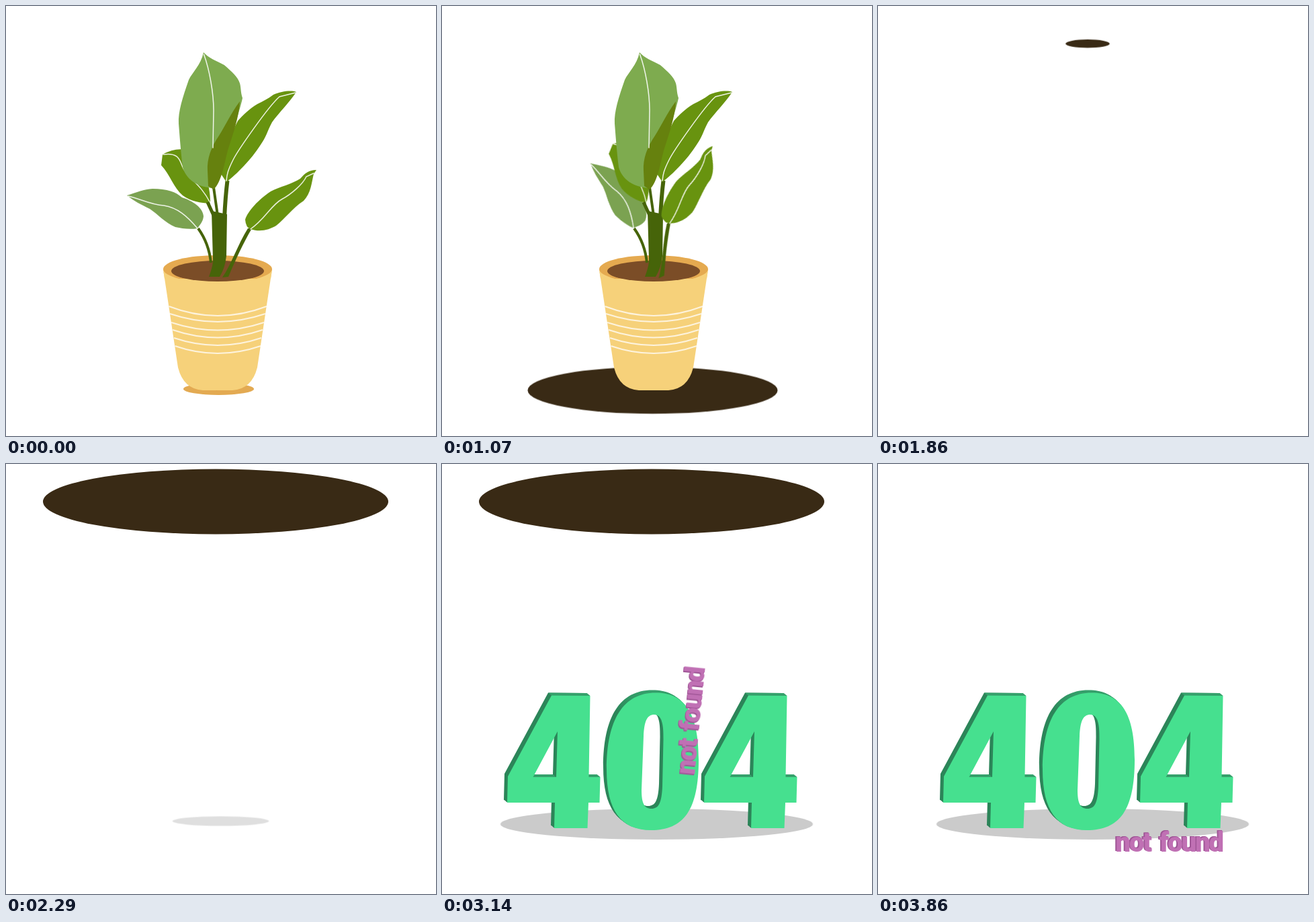
An HTML page for the animation above (5 s loop, 640 by 640 pixels).

```html
<!DOCTYPE html>
<html lang="en">
<head>
<meta charset="utf-8">
<title>404 not found</title>
<style>
  html, body { margin: 0; width: 100%; height: 100%; overflow: hidden; background: #fff; }
  svg { display: block; width: 100vw; height: 100vh; }

  .anim { animation: 5s linear infinite; }
  .vein { fill: none; stroke: #fff; stroke-opacity: .88; stroke-width: 1.5; stroke-linecap: round; }
  .stripe { fill: none; stroke: #fff; stroke-opacity: .75; stroke-width: 1.9; }
  .stalk { fill: none; stroke: #466409; }
  .light { fill: #7eab4f; }
  .green { fill: #68930f; }
  .fold { fill: #66810e; }
  .stem { fill: #466409; }
  .hole { fill: #392a15; }
  .wall { fill: #2c8559; }
  .ledge { fill: #35a06b; }
  .face { fill: #46e08f; }
  .label {
    font: 900 40px Roboto, "Liberation Sans", sans-serif;
    letter-spacing: -2.1px;
    word-spacing: 5px;
  }

  /* leaves lift while the floor opens, then everything drops */
  .low-right { transform-origin: 326px 403px; animation-name: low-right; }
  .low-left { transform-origin: 286px 331px; animation-name: low-left; }
  .back-left { transform-origin: 304px 294px; animation-name: back-left; }
  @keyframes low-right { 0% { transform: rotate(0deg); } 23%, 100% { transform: rotate(-20.4deg); } }
  @keyframes low-left { 0% { transform: rotate(0deg); } 23%, 100% { transform: rotate(33.6deg); } }
  @keyframes back-left { 0% { transform: rotate(0deg); } 23%, 100% { transform: rotate(16.1deg); } }

  .plant { animation-name: plant; }
  @keyframes plant {
    0%, 23% { transform: translateY(0); animation-timing-function: cubic-bezier(.333, 0, .667, .333); }
    28.8%, 100% { transform: translateY(545px); }
  }

  .saucer { animation-name: saucer; }
  @keyframes saucer {
    0%, 10% { visibility: visible; }
    10.01%, 100% { visibility: hidden; }
  }

  .floor { animation-name: floor; }
  @keyframes floor {
    0% { transform: scale(0); }
    10% { transform: scale(.898); }
    30% { transform: scale(1); }
    34%, 100% { transform: scale(0); }
  }

  .ceiling { animation-name: ceiling; }
  @keyframes ceiling {
    0%, 36.3% { transform: scale(0); }
    43.5%, 63% { transform: scale(1); }
    69.8%, 100% { transform: scale(0); }
  }

  .shadow { animation-name: shadow; }
  @keyframes shadow {
    0%, 39.3% { transform: translateY(-6.5px) scale(0); opacity: .09; }
    60.4%, 100% { transform: translateY(0) scale(1); opacity: .207; }
  }

  .digits { animation-name: digits; }
  @keyframes digits {
    0%, 48.6% { transform: translate(6.9px, -502px); animation-timing-function: cubic-bezier(.333, 0, .667, 0); }
    59.72%, 100% { transform: translate(0, 0); }
  }

  .label { animation-name: label; }
  @keyframes label {
    0%, 56.99% {
      visibility: hidden;
      transform: translate(376px, 43px) rotate(-84.4deg);
    }
    57% {
      visibility: visible;
      transform: translate(376px, 43px) rotate(-84.4deg);
      animation-timing-function: cubic-bezier(.333, 0, .667, .333);
    }
    63.56%, 70.3% {
      visibility: visible;
      transform: translate(376px, 577px) rotate(-84.4deg);
      animation-timing-function: cubic-bezier(.333, 0, .667, .333);
    }
    77.2%, 100% {
      visibility: visible;
      transform: translate(353.5px, 577px) rotate(0deg);
    }
  }
</style>
</head>
<body>
<svg viewBox="0 0 640 640">
  <defs>
    <clipPath id="above-floor">
      <path d="M0 0H640V572H508A194.5 36.5 0 0 1 119 572H0Z"/>
    </clipPath>
    <clipPath id="below-ceiling"><rect y="43" width="640" height="597"/></clipPath>
    <linearGradient id="curve" x1="0" y1="0" x2="0" y2="1">
      <stop offset="0" stop-color="#35a06b"/>
      <stop offset=".15" stop-color="#2c8559"/>
    </linearGradient>
    <path id="four" fill-rule="evenodd" d="M163 344.5L220.5 345L218.5 466H235.5L234.5 504H218L216.5 542H167L168 504H97L98 465Z
      M172 398L170 466H135.5Z"/>
    <path id="zero" fill-rule="evenodd" d="M318 340.5C362 340.5 382 372 382 440C382 515 360 545 311 545C266 545 245 515 245 455C245 380 270 340.5 318 340.5Z
      M316 373C327 373 330 387 329.5 410L328 480C327 505 322 513 312 513C300 513 297 503 297 485L300 405C301 383 305 373 316 373Z"/>
    <g id="four-solid">
      <g class="wall">
        <use href="#four" x="-5" y="-4"/><use href="#four" x="-4" y="-3.2"/>
        <use href="#four" x="-3" y="-2.4"/><use href="#four" x="-2" y="-1.6"/>
        <use href="#four" x="-1" y="-.8"/>
      </g>
      <path class="ledge" d="M158 340.5L215.5 341L220.5 345L163 344.5ZM214 462H230.5L235.5 466H218ZM137 462H165L170 466H135Z"/>
      <use class="face" href="#four"/>
    </g>
  </defs>

  <ellipse class="anim saucer" cx="316.5" cy="570" rx="52.5" ry="9" fill="#e3aa52"/>
  <g transform="translate(313.5 572)">
    <ellipse class="anim floor hole" rx="194.5" ry="36.5"/>
  </g>

  <g clip-path="url(#above-floor)">
    <g class="anim plant">
      <path fill="#f6d17a" d="M234 392L256 538Q264 570 293 572H337Q366 570 374 538L396 392Z"/>
      <ellipse cx="315" cy="391.5" rx="81" ry="20.5" fill="#e5aa50"/>
      <path fill="#f6d17a" d="M234 393A81 20 0 0 0 396 393L394 406H236Z"/>
      <ellipse cx="315" cy="394.5" rx="69" ry="15.5" fill="#7b4d27"/>
      <path class="stripe" d="M242.5 447Q315 475 388 447M244 458Q315 482 386 458M246 471Q315 494 384 471
        M248 482Q315 505 382 482M250 494Q315 516 380 494M251.5 506Q315 528 379 506"/>

      <g class="anim low-left">
        <path fill="#7ba251" d="M180 282C195 277 205 273 218 272C240 272 253 277 262 285C278 290 293 300 294 313C293 322 288 326 285 331C272 333 262 331 252 329C236 322 226 310 214 302C200 295 190 290 180 282Z"/>
        <path class="vein" d="M182 283C200 287 215 296 235 297C255 300 270 313 285 331"/>
      </g>
      <g class="anim back-left">
        <path class="green" d="M233 221C245 214 260 211 270 215C295 235 305 270 304 294C290 293 275 291 263 282C249 270 245 252 231 237Z"/>
        <path class="vein" d="M234 221C262 217 258 235 266 245C276 260 290 266 304 293"/>
      </g>

      <path class="stem" d="M302 403C306 392 308 385 308 378L306 305L329 310L328 372Q326 390 318 403Z"/>
      <path class="stalk" stroke-width="4" d="M286 331C296 345 303 362 305 382M309 270L315 312"/>
      <path class="stalk" stroke-width="5" d="M300 292L311 316"/>
      <path class="stalk" stroke-width="6" d="M329.5 260C327 280 326 295 325 316"/>

      <path class="green" d="M432 128C425 125 409 127 398 132C390 138 382 142 374 146C362 153 352 163 345 171C335 190 325 220 320 250L328 262C343 251 366 227 378 208C388 194 388 188 396 173C406 159 424 141 432 128Z"/>
      <path class="vein" d="M431 129L407 135C390 150 345 215 338 229C330 245 329 250 328 260"/>

      <path class="light" d="M294 69C302 78 312 81 325 88C336 98 345 105 348 115C350 122 349 128 352 137C347 160 330 210 309 271C285 270 268 258 263 240C260 215 259 200 257 175C256 157 263 136 272 110C277 99 290 88 294 69Z"/>
      <path class="fold" d="M348 142C335 159 326 179 317 193C305 210 299 228 300 245L301 268L309 273C321 262 325 234 330 215C338 190 347 165 348 142Z"/>
      <path class="vein" d="M294.5 72C303 95 309 130 309 155L308 211"/>

      <g class="anim low-right">
        <path class="stem" d="M366 331C352 355 343 375 331 403L322 404C335 385 345 355 360 331Z"/>
        <path class="green" d="M462 244C451 244 445 249 438 257C426 265 407 269 394 276C376 288 360 305 356 318Q357 330 364 332C378 337 392 333 402 327C415 317 426 301 443 290C454 279 455 262 458 250Z"/>
        <path class="vein" d="M458 249L447 254C442 265 425 280 410 288C395 296 385 318 364 332"/>
      </g>
    </g>
  </g>

  <g transform="translate(319.5 536)">
    <ellipse class="anim shadow" rx="232.5" ry="23"/>
  </g>
  <g transform="translate(312 56)">
    <ellipse class="anim ceiling hole" rx="257" ry="48.5"/>
  </g>

  <g clip-path="url(#below-ceiling)">
    <g class="anim digits">
      <use href="#four-solid"/>
      <g fill="url(#curve)">
        <use href="#zero" x="-5" y="-4"/><use href="#zero" x="-4" y="-3.2"/>
        <use href="#zero" x="-3" y="-2.4"/><use href="#zero" x="-2" y="-1.6"/>
        <use href="#zero" x="-1" y="-.8"/>
      </g>
      <use class="face" href="#zero"/>
      <use href="#four-solid" x="293"/>
    </g>
    <g class="anim label">
      <g fill="#9f5696" aria-hidden="true">
        <text x="-2" y="-1.5">not found</text>
        <text x="-1" y="-.8">not found</text>
      </g>
      <text fill="#c070b4">not found</text>
    </g>
  </g>
</svg>
</body>
</html>
```
